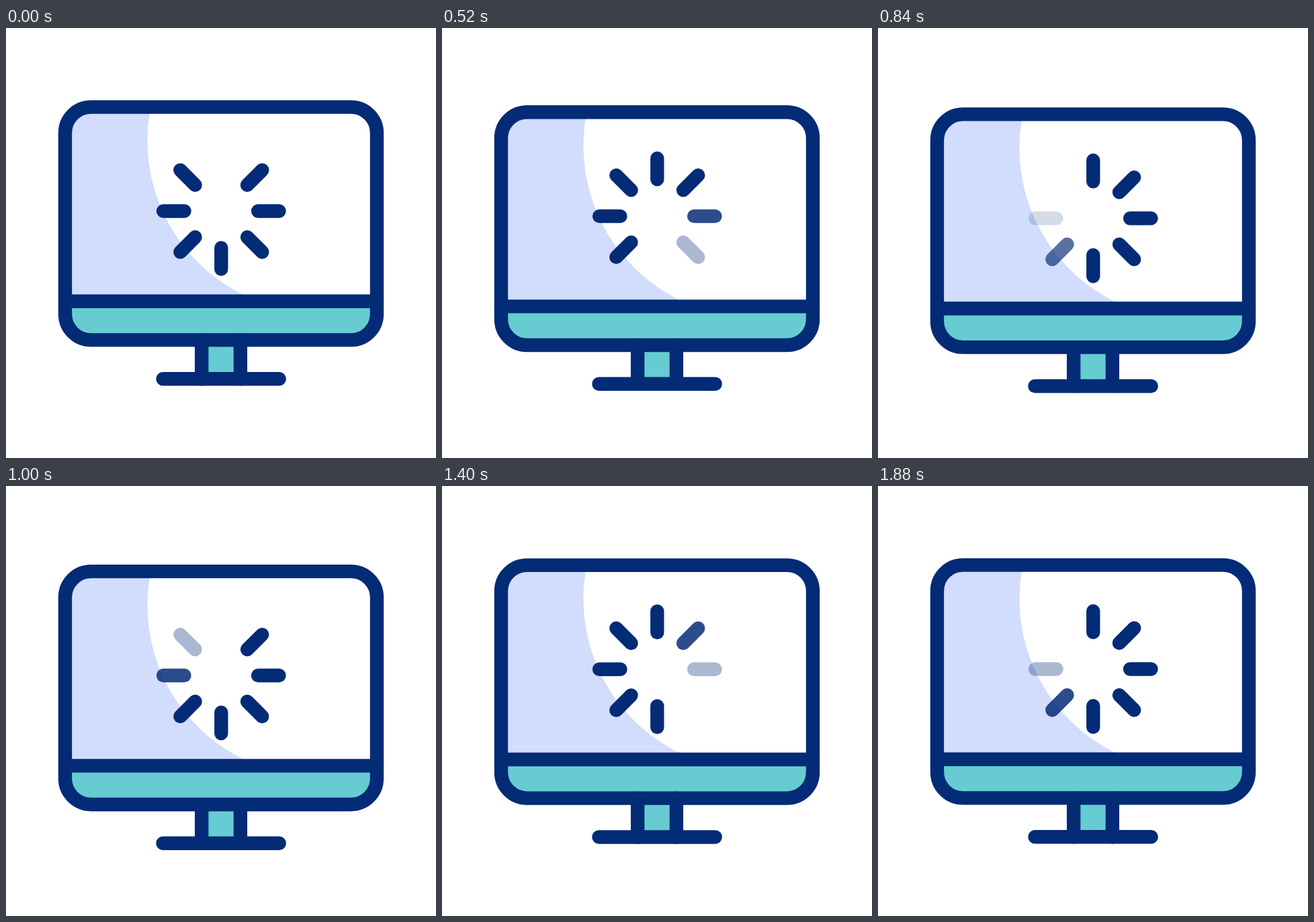
An HTML page with a canvas for the animation above (1.92 s loop, 640x640 px).

```html
<!DOCTYPE html>
<html lang="en">
<head>
<meta charset="utf-8">
<title>Loading monitor</title>
<style>
html, body { margin: 0; width: 100%; height: 100%; overflow: hidden; background: #fff; }
canvas { display: block; width: 100vmin; height: 100vmin; }
</style>
</head>
<body>
<canvas id="stage" width="640" height="640"></canvas>
<script>
const ctx = document.getElementById('stage').getContext('2d');
const NAVY = '#032b76', TEAL = '#67ccd1', LILAC = '#d2dcfd';
const LOOP = 1920, STEP = 40, FADE = 6, DROP = 10.8;

// Symmetric ease-in-out with strong holds at both ends
function ease(x) {
  if (x <= 0) return 0;
  if (x >= 1) return 1;
  let lo = 0, hi = 1;
  for (let i = 0; i < 24; i++) {
    const m = (lo + hi) / 2;
    if (1.8 * m - 2.4 * m * m + 1.6 * m * m * m < x) lo = m; else hi = m;
  }
  return lo * lo * (3 - 2 * lo);
}

function line(x1, y1, x2, y2) {
  ctx.beginPath();
  ctx.moveTo(x1, y1);
  ctx.lineTo(x2, y2);
  ctx.stroke();
}

function body() {
  ctx.beginPath();
  ctx.roundRect(88, 117.6, 464, 346.8, 38.6);
}

// Each spoke blinks off, waits two ticks, then fades back in
function spokeAlpha(spoke, tick) {
  let alpha = 1;
  for (let n = spoke; n < 18; n += 8) {
    const start = 2 + 3 * n + (n > 8 ? 1 : 0);
    if (tick >= start - 2) alpha = Math.min(1, Math.max(0, (tick - start) / FADE));
  }
  return alpha;
}

function drawScreen() {
  ctx.save();
  body();
  ctx.clip();
  ctx.fillStyle = LILAC;
  ctx.fillRect(88, 117, 300, 290);
  ctx.fillStyle = '#fff';
  ctx.beginPath();
  ctx.arc(465.5, 168, 255, 0, Math.PI * 2);
  ctx.fill();
  ctx.fillStyle = TEAL;
  ctx.fillRect(88, 406.8, 464, 58);
  ctx.restore();
}

function drawSpokes(tick) {
  for (let i = 0; i < 8; i++) {
    const a = i * Math.PI / 4, dx = Math.sin(a), dy = -Math.cos(a);
    ctx.globalAlpha = spokeAlpha(i, tick);
    line(320.3 + dx * 54.8, 272.5 + dy * 54.8, 320.3 + dx * 86.2, 272.5 + dy * 86.2);
  }
  ctx.globalAlpha = 1;
}

function draw(tick) {
  const y = DROP * (ease((tick - 3) / 17) - ease((tick - 20) / 17.4));
  ctx.fillStyle = '#fff';
  ctx.fillRect(0, 0, 640, 640);
  ctx.save();
  ctx.translate(0, y);
  drawScreen();
  ctx.fillStyle = TEAL;
  ctx.fillRect(291, 464, 58, 58);
  ctx.strokeStyle = NAVY;
  ctx.lineWidth = 20.4;
  ctx.lineCap = 'round';
  body();
  ctx.stroke();
  line(88, 406.8, 552, 406.8);
  line(291.2, 464.4, 291.2, 522.2);
  line(348.9, 464.4, 348.9, 522.2);
  line(233.5, 522.2, 406.7, 522.2);
  drawSpokes(tick);
  ctx.restore();
}

function frame() {
  draw(Math.floor((performance.now() % LOOP) / STEP));
  requestAnimationFrame(frame);
}
frame();
</script>
</body>
</html>
```
